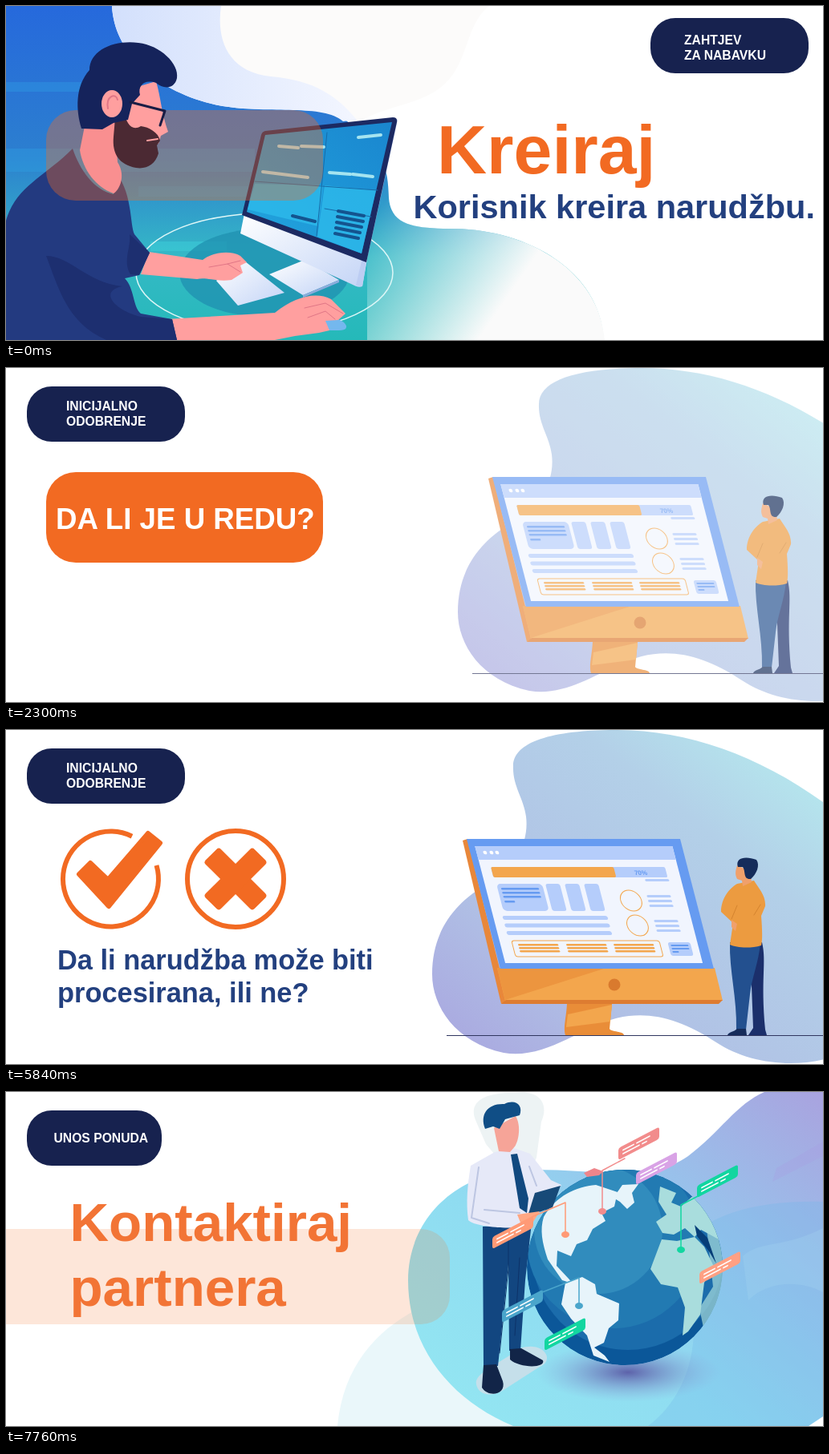
An HTML page that plays this animation: 1018 by 417 pixels, repeating every 8000 ms.

```html
<!DOCTYPE html>
<html lang="bs">
<head>
<meta charset="utf-8">
<title>Proces nabavke</title>
<style>
  html, body { margin: 0; width: 100%; height: 100%; overflow: hidden; background: #fff; }
  svg { display: block; width: 100%; height: 100%; }
  text { font-family: "Liberation Sans", Arial, sans-serif; font-weight: bold; }
  .scene { display: none; }
  .pill { fill: #17224f; }
  .label { fill: #fff; font-size: 15.7px; }
  .orange { fill: #f26a22; }
  .navy { fill: #23407f; }
  .line { fill: none; stroke-linecap: round; stroke-linejoin: round; }
</style>
</head>
<body>
<svg viewBox="0 0 1018 417">
  <defs>
    <linearGradient id="room" x2="0" y2="1">
      <stop stop-color="#2669dc"/><stop offset=".45" stop-color="#2c7fcf"/>
      <stop offset=".75" stop-color="#35b9c6"/><stop offset="1" stop-color="#25b9b9"/>
    </linearGradient>
    <linearGradient id="fade" gradientUnits="userSpaceOnUse" x1="440" y1="290" x2="600" y2="400">
      <stop stop-color="#fafafa" stop-opacity="0"/><stop offset="1" stop-color="#fafafa"/>
    </linearGradient>
    <linearGradient id="cloud"><stop stop-color="#d3e0fc"/><stop offset="1" stop-color="#f3f6ff"/></linearGradient>
    <linearGradient id="display" x1="1" x2="0" y2="1">
      <stop stop-color="#1a86cf"/><stop offset="1" stop-color="#22a6de"/>
    </linearGradient>
    <linearGradient id="metal" y2="1"><stop stop-color="#fff"/><stop offset="1" stop-color="#c3d4f6"/></linearGradient>
    <linearGradient id="blob" x1="0" y1="1" x2="1" y2="0">
      <stop stop-color="#a8a4df"/><stop offset=".3" stop-color="#b0c0e5"/>
      <stop offset=".68" stop-color="#b3d0e8"/><stop offset="1" stop-color="#b6f3f0"/>
    </linearGradient>
    <linearGradient id="sea" x1="0" y1="1" x2="1" y2="0">
      <stop stop-color="#94e8f2"/><stop offset=".4" stop-color="#8fdcf1"/>
      <stop offset=".66" stop-color="#97c4ec"/><stop offset="1" stop-color="#a9a3df"/>
    </linearGradient>
    <radialGradient id="shade">
      <stop stop-color="#5d62aa"/><stop offset="1" stop-color="#8fa8dc" stop-opacity="0"/>
    </radialGradient>
    <clipPath id="globe"><circle cx="771" cy="219" r="122"/></clipPath>

    <g id="office">
      <path fill="url(#blob)" d="M632 45C632 15 680 0 760 0C860 0 960 40 1050 115V400C1000 425 930 420 885 390C840 360 800 350 760 360C715 372 670 412 620 403C560 390 531 345 531 305C531 250 560 215 600 192C635 172 652 140 648 108C645 85 631 70 632 45Z"/>
      <path fill="#e8873a" d="M569 138L575 136L625 338L617 342Z"/>
      <path fill="#f3a64d" d="M612 297H883L893 338H622Z"/>
      <path fill="#ec953f" d="M612 297H748L622 337Z"/>
      <path fill="#dd7c31" d="M617 342L623 337H893L888 342Z"/>
      <circle cx="758" cy="318" r="7.5" fill="#d97a2e"/>
      <path fill="#e98d38" d="M699 342H755L752 373C753 377 770 376 770 381H697C694 372 698 360 699 342Z"/>
      <path fill="#f3a64d" d="M700 355L755 343L753 364L698 371Z"/>
      <g id="screen" transform="translate(574 136) skewX(14.5)"></g>
      <path stroke="#30365f" d="M549 381.5H1050"/>

      <path fill="#1b2f6b" d="M927 267L942 265C948 290 940 310 946 374L948 381H925L931 372Z"/>
      <path fill="#23508f" d="M902 265L940 266C938 290 929 310 927 330L922 374H910C911 335 901 300 902 265Z"/>
      <path fill="#152c5b" d="M911 373H922L923 381H899C900 377 907 377 911 373Z"/>
      <path fill="#ec9b40" d="M911 192L932 188C938 198 947 207 946 220L941 232C942 246 943 260 941 269C928 273 910 272 902 268L906 241L891 227C891 210 902 197 911 192Z"/>
      <path fill="#f0a06b" d="M904 237L911 242L909 251L904 246ZM911 169C909 176 908 180 911 186L917 188L918 195L929 190L927 176Z"/>
      <path class="line" stroke="#d5842f" d="M911 219L904 236M940 218L932 231"/>
      <path fill="#152c5b" d="M912 171C908 159 922 157 935 162C940 169 935 180 928 186C918 187 922 176 918 171Z"/>
    </g>
  </defs>

  <g class="scene">
    <path fill="#fcfbfa" d="M268 0H602C570 25 578 75 540 103C510 125 470 125 440 145L330 120C265 100 262 40 268 0Z"/>
    <path fill="url(#room)" d="M0 0H132C135 60 190 110 270 125C330 135 400 118 430 148C470 180 476 200 477 240C480 275 510 278 560 278C650 280 740 330 745 417H0Z"/>
    <path fill="url(#fade)" d="M450 240H477C480 275 510 278 560 278C650 280 740 330 746 418H450Z"/>
    <path fill="url(#cloud)" d="M132 0H268C262 40 275 82 330 88C385 93 412 112 437 142L420 144C395 122 330 135 270 125C190 110 135 60 132 0Z"/>
    <g fill="#2fa9e8" opacity=".3">
      <path d="M0 95H95V107H0ZM0 178H310V207H0ZM165 225H305V238H165Z"/>
      <path fill="#42e0e6" d="M180 294H275V306H180Z"/>
    </g>
    <ellipse cx="322" cy="333" rx="106" ry="55" fill="#1f91b0" opacity=".75"/>
    <ellipse cx="322" cy="333" rx="160" ry="74" fill="none" stroke="#dff7f7" stroke-width="1.5"/>
    <path fill="url(#metal)" d="M328 335L372 317L415 342L370 361Z"/>
    <path fill="#8cacdc" d="M370 361L415 342V345L370 364Z"/>
    <path fill="url(#metal)" d="M292 284L297 259L450 316L444 350C440 352 436 350 430 347Z"/>
    <path fill="#bccdf2" d="M484 140L488 142L449 320L444 350L436 349Z"/>
    <path fill="#1c2a62" d="M323 156L482 139Q488 139 487 145L449 320L294 261L318 161Q319 157 323 156Z"/>
    <path fill="url(#display)" d="M323 161L481 145L443 309L300 257Z"/>
    <path fill="#2ebcec" d="M397 224L461 230L443 309L388 288ZM310 222L395 224L389 275L301 254Z" opacity=".75"/>
    <path class="line" stroke="#176ba9" d="M310 219L463 230M400 158L387 287M397 253L455 263"/>
    <g class="line" stroke="#a5e4f0" stroke-width="4" stroke-linecap="butt">
      <path d="M439 164L467 161M340 175L364 177M368 175L396 176M320 207L376 214M403 208L429 210M432 210L457 213"/>
      <path stroke="#14548f" d="M357 262L385 269M414 256L446 262M413 263L445 269M412 270L443 276M411 277L441 283M410 284L439 290"/>
    </g>
    <path fill="url(#metal)" d="M262 343L293 315L347 358L289 374Z"/>
    <path fill="#ff9f9f" d="M178 307L245 317C258 307 280 305 292 312L300 320L292 324L295 333L281 342C262 345 250 338 238 341L168 335Z"/>
    <path class="line" stroke="#e07686" d="M253 326L276 322L292 332M276 322L292 318"/>
    <path fill="#74b8ee" d="M389 401C394 390 411 387 421 395C427 401 424 405 415 405H390Z"/>
    <path fill="#ff9f9f" d="M200 391L335 383C360 363 386 356 405 366L423 384L414 392L398 393L403 405L390 408L360 412L330 418H200Z"/>
    <path class="line" stroke="#e07686" d="M372 377L398 371L420 384M376 389L398 381L410 391"/>
    <path fill="#233a80" d="M83 178C92 205 110 230 134 235L137 208C158 235 154 272 160 285L179 308L166 336L148 340C160 352 158 376 168 384L207 391L213 417H0V268C12 225 50 212 83 178Z"/>
    <path fill="#1d2f70" d="M50 312C80 312 100 345 145 350C115 356 135 380 168 388L207 391L213 417H125C75 395 65 350 50 312ZM154 285C156 302 145 318 155 335L166 336L179 308Z"/>
    <rect x="50" y="130" width="345" height="113" rx="37" class="orange" opacity=".36"/>
    <path fill="#f98f90" d="M98 150L135 135L139 195C151 214 139 232 134 234C112 226 96 205 92 180Z"/>
    <path fill="#ff9f9f" d="M150 105L187 94C193 115 194 135 202 157L193 162L190 172L150 165Z"/>
    <path fill="#4b2933" d="M146 128C150 150 158 156 168 150C178 151 190 158 192 168L188 174L190 184C186 198 175 204 162 202C141 198 132 185 134 163L136 140Z"/>
    <path class="line" stroke="#ff9f9f" stroke-width="2" d="M176 168L189 166"/>
    <path fill="#15235b" d="M94 153C87 130 86 100 104 80C104 55 135 42 165 46C192 49 216 72 213 90C210 104 196 104 187 96C172 91 164 100 167 111L157 122L152 142L134 146L120 154Z"/>
    <ellipse cx="132" cy="122" rx="13" ry="17" fill="#ff9f9f"/>
    <path class="line" stroke="#e07686" stroke-width="2" d="M127 128C124 112 137 108 139 117"/>
    <path class="line" stroke="#191d45" stroke-width="3" d="M155 120L198 131L192 149"/>
    <text x="537" y="208.5" font-size="86" class="orange">Kreiraj</text>
    <text x="507.5" y="265" font-size="41.5" class="navy">Korisnik kreira narudžbu.</text>
    <rect x="803" y="15" width="197" height="69" rx="31" class="pill"/>
    <text class="label" x="845" y="48">ZAHTJEV<tspan x="845" y="67">ZA NABAVKU</tspan></text>
  </g>

  <g class="scene">
    <use href="#office" x="32" opacity=".67"/>
    <g id="approval">
      <rect x="26" y="23" width="197" height="69" rx="31" class="pill"/>
      <text class="label" x="75" y="53">INICIJALNO<tspan x="75" y="72">ODOBRENJE</tspan></text>
    </g>
    <rect x="50" y="130" width="345" height="113" rx="37" class="orange"/>
    <text x="62" y="201" font-size="36.7" fill="#fff">DA LI JE U REDU?</text>
  </g>

  <g class="scene">
    <use href="#office"/>
    <use href="#approval"/>
    <g fill="none" stroke="#f26a22" stroke-width="6">
      <path d="M157 132.7A59.5 59.5 0 1 0 187.5 169"/>
      <circle cx="286" cy="186" r="60"/>
    </g>
    <path fill="#f26a22" stroke="#f26a22" stroke-width="6" stroke-linejoin="round" d="M91 180L105 166L127 187L177 129L192 141L128 220Z"/>
    <g class="orange" transform="translate(286 186) rotate(45)">
      <rect x="-43" y="-13.5" width="86" height="27" rx="4"/>
      <rect x="-13.5" y="-43" width="27" height="86" rx="4"/>
    </g>
    <text x="64" y="299" font-size="34.4" class="navy">Da li narudžba može biti<tspan x="64" y="340">procesirana, ili ne?</tspan></text>
  </g>

  <g class="scene">
    <path fill="#eaf7fa" d="M413 417C420 340 465 295 515 270L700 417Z"/>
    <path fill="url(#sea)" d="M501 235C501 160 560 98 650 97C740 96 800 115 850 80C890 50 910 15 945 0H1018V405L1000 417H632C555 385 501 320 501 235Z"/>
    <path fill="#72b5e8" opacity=".3" d="M835 200C870 150 940 135 1018 137V405L1000 417H800C850 380 880 300 835 200Z"/>
    <path fill="#a69de0" opacity=".3" d="M960 95L1018 62V80L955 112Z"/>
    <path fill="#a9d6ef" opacity=".25" d="M918 205C940 185 970 195 1018 170V250C990 235 950 235 925 260Z"/>
    <path class="orange" opacity=".17" d="M0 171H517A36 36 0 0 1 553 207V254A36 36 0 0 1 517 290H0Z"/>
    <path fill="#edf3f4" d="M585 35C575 10 600 0 635 1C665 -3 677 15 667 37L661 82C655 98 640 90 625 97L598 65Z"/>
    <ellipse cx="775" cy="350" rx="115" ry="37" fill="url(#shade)"/>
    <path fill="#c5dfea" d="M586 365C583 350 615 340 640 320C670 310 685 335 665 343L620 372C605 382 588 378 586 365Z"/>

    <g clip-path="url(#globe)">
      <circle cx="771" cy="219" r="122" fill="#0b5799"/>
      <circle cx="775" cy="203" r="119" fill="#1b6cab"/>
      <circle cx="757" cy="187" r="108" fill="#227ab2"/>
      <circle cx="738" cy="172" r="80" fill="#318cbd"/>
      <g fill="#e7f4fa">
        <path d="M670 156C685 130 710 118 735 116L762 125L758 143L742 151L747 161L731 171L724 185L711 190L704 205L687 198L686 217L701 233L706 239L693 235L675 209C668 188 665 172 670 156Z"/>
        <path d="M768 116L788 115L780 126L783 138L774 146L765 137L757 132Z"/>
        <path d="M697 238L718 231L734 240L736 252L764 264L763 285L751 295L745 313L733 319L746 329L752 337L732 329L724 304L704 283L692 265Z"/>
      </g>
      <g fill="#a9dddd">
        <path d="M815 118L835 126L829 138L841 143L858 128L874 140L890 178L888 184L866 172L858 181L846 170L832 178L818 176L810 162L823 153L813 137Z"/>
        <path d="M817 184L836 186L858 181L870 193L882 218L870 238L865 278L850 299L843 304L846 269L837 244L816 240L803 221Z"/>
        <path opacity=".7" d="M873 170L896 190V261L879 280L870 299L864 270L881 243Z"/>
      </g>
      <path fill="#063e78" d="M858 166L874 182L885 214L876 199L861 180Z"/>
    </g>

    <path fill="#124680" d="M594 168L655 163L647 235L641 323H627L626 215L613 342H595Z"/>
    <path class="line" stroke="#0d3268" d="M626 180V221L615 326M640 207L634 304"/>
    <path fill="#122548" d="M595 341L611 340L619 361C624 378 601 382 593 369ZM628 321L642 320L669 335C673 345 640 345 628 334Z"/>
    <path fill="#e6e9f8" d="M579 92L609 75L633 70L653 77L679 110L692 116L686 126L660 126L654 154L638 169C617 171 582 167 576 160C573 138 575 116 579 92Z"/>
    <path class="line" stroke="#bdc6e2" stroke-width="2" d="M589 94L580 157L602 164M596 147L640 151M652 93L661 117"/>
    <path fill="#11497f" d="M629 78L637 77L651 133L649 151L640 145Z"/>
    <path fill="#f6a498" d="M608 45L635 30C642 42 639 60 634 68L628 75L614 74Z"/>
    <path fill="#104e86" d="M597 46C590 28 600 14 621 15C635 8 645 17 640 29L622 34L615 46L607 43Z"/>
    <path fill="#174a78" d="M659 126L691 117L681 144L650 155Z"/>
    <path fill="#ffa783" d="M637 153L651 151L665 149L657 162L641 163Z"/>
    <path fill="#ee858b" d="M720 101L733 95L744 99L739 104L724 106Z"/>
    <g id="tags"></g>
    <rect x="26" y="23" width="168" height="69" rx="31" class="pill"/>
    <text class="label" x="59.5" y="63">UNOS PONUDA</text>
    <text x="79.5" y="185.5" font-size="67.3" fill="#f27435">Kontaktiraj<tspan x="79.5" y="266.5">partnera</tspan></text>
  </g>
</svg>
<script>
const $ = id => document.getElementById(id);
const rect = (x, y, w, h, fill, r = 0, extra = '') =>
  `<rect x="${x}" y="${y}" width="${w}" height="${h}" rx="${r}" fill="${fill}" ${extra}/>`;
const lines = (x, y, w, step, count, fill, h = 2.5) =>
  Array.from({ length: count }, (_, i) => rect(x, y + i * step, w, h, fill, h / 2)).join('');

function screenMarkup() {
  const pale = '#b5cdfb', blue = '#669bf1', gold = '#f3a64d';
  return [
    rect(0, 0, 266, 162, blue), rect(8, 9, 246, 146, '#f1f5fe'), rect(8, 9, 246, 17, pale),
    ...[20, 28, 35].map(x => `<circle cx="${x - 1.5}" cy="17" r="2.3" fill="#fff"/>`),
    rect(21, 35, 217, 13, pale, 2), rect(21, 35, 153, 13, gold, 2),
    `<text x="198" y="45" font-size="8" fill="${blue}">70%</text>`,
    rect(22.5, 56, 57, 34, pale, 5), lines(27, 61, 47, 5, 3, blue), rect(27, 77, 13, 2.5, blue, 1),
    ...[0, 24, 48].map(x => rect(83.5 + x, 56, 18, 34, pale, 3)),
    lines(19.5, 96, 131, 9.5, 3, pale, 5),
    lines(209, 50, 30, 6, 1, pale, 3), lines(206, 70, 30, 6, 3, pale, 3), lines(207, 101, 30, 6, 3, pale, 3),
    ...[77, 108].map(y => `<circle cx="185" cy="${y}" r="13" fill="none" stroke="${gold}"/>`),
    rect(23, 127, 184, 20, 'none', 3, `stroke="${gold}"`),
    ...[30, 90, 149].map(x => lines(x, 131, 50, 4, 3, gold)),
    rect(217, 129, 28, 17, pale, 3), lines(220, 132, 22, 4, 2, blue, 2), lines(220, 140, 8, 4, 1, blue, 2)
  ].join('');
}

// Each tag: left edge, top, colour, and optional leader line ending in a dot.
const tags = [
  [763, 70, '#f28c8c', [771, 83, 743, 98, 743, 149]],
  [785, 101, '#d9a3e6'],
  [861, 117, '#12d6a0', [866, 128, 841, 141, 841, 197]],
  [864, 225, '#ffa083'],
  [606, 181, '#ff9a76', [655, 156, 697, 138, 697, 178]],
  [618, 273, '#4aa5cb', [668, 250, 714, 232, 714, 267]],
  [671, 308, '#12d6a0']
];

function tagMarkup([x, y, color, leader]) {
  const link = leader ? `<polyline class="line" points="${leader}" stroke="${color}" stroke-width="1.5"/>
    <ellipse cx="${leader[4]}" cy="${leader[5]}" rx="5" ry="4" fill="${color}"/>` : '';
  return `${link}<g transform="translate(${x} ${y}) skewY(-27.5)">${rect(0, 0, 51, 15, color, 3)}
    <path class="line" stroke="#fff" stroke-width="1.8" d="M6 5.5H19M23 5.5H39M6 10H26M30 10H35"/></g>`;
}

$('screen').innerHTML = screenMarkup();
$('tags').innerHTML = tags.map(tagMarkup).join('');

const scenes = [...document.querySelectorAll('.scene')];
const ends = [500, 3500, 7400, 8000];
const start = performance.now();

function draw() {
  const time = Math.max(0, performance.now() - start) % 8000;
  const current = ends.findIndex(end => time < end);
  scenes.forEach((scene, i) => { scene.style.display = i === current ? 'inline' : 'none'; });
  requestAnimationFrame(draw);
}
draw();
</script>
</body>
</html>
```
